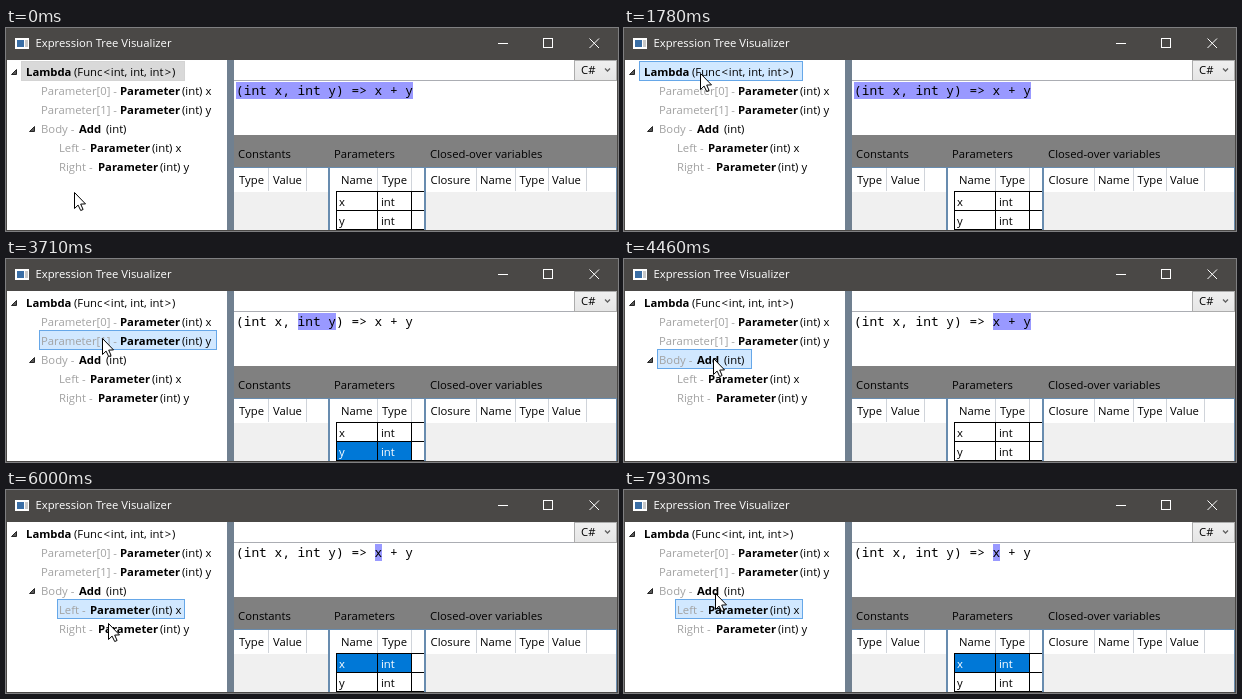
These frames come from a looping animation (612x203 px, 8 s). An HTML page with a canvas:

```html
<!DOCTYPE html>
<html lang="en">
<head>
<meta charset="utf-8">
<title>Expression Tree Visualizer</title>
<style>
  html, body { margin: 0; width: 100%; height: 100%; overflow: hidden; background: #fff; }
  canvas { display: block; }
</style>
</head>
<body>
<canvas id="stage" width="612" height="203"></canvas>
<script>
const ctx = document.getElementById('stage').getContext('2d');
const LOOP = 8000;
const TICKS = 104;
const UI = '11.3px "Open Sans", sans-serif';
const BOLD = 'bold 11.3px "Open Sans", sans-serif';
const CODE = '12.83px "Noto Sans Mono", monospace';
const GRAY = '#808080', MUTED = '#a2a2a2', GRID = '#688caf', PICKED = '#0078d7';
const TITLE = '#4a4846', SPLITTER = '#708090';

// Each row: selection box left/right, then text pieces as [x, text, style].
const rows = [
  { box: [15, 179], parts: [[20, 'Lambda', 'bold'], [68, '(Func'], [97.4, '<'],
    [104.8, 'int, int, int'], [158.7, '>'], [166, ')']] },
  { box: [33, 211], parts: [[35, 'Parameter[0] -', 'muted'], [114, 'Parameter', 'bold'], [176, '(int) x']] },
  { box: [33, 211], parts: [[35, 'Parameter[1] -', 'muted'], [114, 'Parameter', 'bold'], [176, '(int) y']] },
  { box: [33, 128], parts: [[35, 'Body -', 'muted'], [73, 'Add', 'bold'], [100, '(int)']] },
  { box: [51, 179], parts: [[53, 'Left -', 'muted'], [84, 'Parameter', 'bold'], [146, '(int) x']] },
  { box: [51, 189], parts: [[53, 'Right -', 'muted'], [92, 'Parameter', 'bold'], [154, '(int) y']] }
];

// Selection changes: start in ms, tree row, marked code characters, table row.
const selections = [
  { at: 0, row: 0, code: [0, 23], inactive: true },
  { at: 1410, row: 0, code: [0, 23] },
  { at: 2320, row: 1, code: [1, 6], param: 0 },
  { at: 3240, row: 2, code: [8, 13], param: 1 },
  { at: 4310, row: 3, code: [18, 23] },
  { at: 5310, row: 4, code: [18, 19], param: 0 },
  { at: 6540, row: 5, code: [22, 23], param: 1 },
  { at: 7540, row: 4, code: [18, 19], param: 0 }
];

// Pointer path: tick, x, y.
const path = [
  [0, 68, 164], [3, 68, 164], [10, 74, 44], [22, 74, 44], [27, 92, 58], [35, 92, 58],
  [39, 95, 77], [46, 96, 78], [48, 96, 79], [53, 89, 99], [58, 89, 99], [66, 103, 126],
  [67, 104, 126], [68, 104, 126], [72, 102, 122], [74, 102, 122], [80, 102, 137],
  [90, 102, 137], [91, 102, 133], [95, 99, 118], [98, 99, 118], [103, 91, 103], [104, 91, 103]
];

function rect(x, y, w, h, color) {
  ctx.fillStyle = color;
  ctx.fillRect(x, y, w, h);
}

function frame(x, y, w, h, color) {
  ctx.strokeStyle = color;
  ctx.lineWidth = 1;
  ctx.strokeRect(x + .5, y + .5, w - 1, h - 1);
}

function text(value, x, y, color = '#000', font = UI) {
  ctx.font = font;
  ctx.fillStyle = color;
  ctx.fillText(value, x, y);
}

function line(points, color, width = 1) {
  ctx.beginPath();
  points.forEach(([x, y]) => ctx.lineTo(x, y));
  ctx.strokeStyle = color;
  ctx.lineWidth = width;
  ctx.stroke();
}

function polygon(points, fill, stroke) {
  ctx.beginPath();
  points.forEach(([x, y]) => ctx.lineTo(x, y));
  ctx.closePath();
  ctx.fillStyle = fill;
  ctx.fill();
  ctx.strokeStyle = stroke;
  ctx.lineWidth = 1;
  ctx.stroke();
}

function drawTitleBar() {
  rect(0, 0, 612, 32, TITLE);
  rect(9, 10, 14, 11, '#fff');
  rect(11, 12, 7, 7, '#3a6ea5');
  rect(19, 12, 3, 7, '#c8c8c8');
  text('Expression Tree Visualizer', 29.5, 19, '#fff');
  rect(492, 15, 10, 1, '#fff');
  frame(537, 10, 10, 10, '#fff');
  line([[583.5, 10.5], [593, 20]], '#fff');
  line([[593, 10.5], [583.5, 20]], '#fff');
}

function drawTree(selected) {
  rect(1, 32, 220, 170, '#fff');
  const [left, right] = rows[selected.row].box;
  const top = 33 + selected.row * 19;
  rect(left, top, right - left, 20, selected.inactive ? '#d9d9d9' : '#d1e8ff');
  frame(left, top, right - left, 20, selected.inactive ? '#d4d4d4' : '#66a7e8');
  rows.forEach((row, i) => {
    const y = Math.round(48 + i * 18.9);
    for (const [x, value, style] of row.parts) {
      text(value, x, y, style === 'muted' ? MUTED : '#000', style === 'bold' ? BOLD : UI);
    }
  });
  for (const [x, y] of [[5, 41], [23, 98]]) {
    polygon([[x + 5.5, y + .5], [x + 5.5, y + 5.5], [x + .5, y + 5.5]], '#595959', '#262626');
  }
}

function drawCode([from, to]) {
  rect(227, 32, 384, 75, '#fff');
  rect(227, 52, 384, 1, '#abadb3');
  const shade = ctx.createLinearGradient(0, 32, 0, 53);
  shade.addColorStop(0, '#f0f0f0');
  shade.addColorStop(1, '#e5e5e5');
  rect(568, 32, 43, 21, shade);
  frame(568, 32, 43, 21, '#acacac');
  text('C#', 575, 46);
  line([[599, 40.5], [601.5, 43], [604, 40.5]], '#606060', 1.3);

  const advance = 7.7;
  const start = Math.round(230 + from * advance);
  rect(start, 54, Math.round(230 + to * advance) - start, 17, '#9999ff');
  text('(int x, int y) => x + y', 230, 67, '#000', CODE);
}

function drawTable(x, right, title, columns) {
  text(title, x + 5, 130);
  rect(x, 139, right - x, 64, '#f0f0f0');
  rect(x, 139, right - x, 25, '#fff');
  frame(x, 139, right - x, 65, GRID);
  for (const [labelX, label, divider] of columns) {
    text(label, labelX, 156);
    rect(divider, 140, 1, 23, '#d0d4da');
  }
}

function drawParameters(picked) {
  rect(324, 163, 94, 39, '#fff');
  ['x', 'y'].forEach((name, i) => {
    const y = 164 + i * 19;
    const active = picked === i;
    if (active) rect(331, y, 75, 18, PICKED);
    text(name, 333, y + 14, active ? '#fff' : '#000');
    text('int', 375, y + 14, active ? '#fff' : '#000');
  });
  for (const y of [163, 182, 201]) rect(330, y, 88, 1, '#000');
  for (const x of [330, 371, 405]) rect(x, 163, 1, 39, '#000');
}

function drawPointer(tick) {
  const next = path.findIndex(key => key[0] > tick);
  const [t0, x0, y0] = path[next - 1];
  const [t1, x1, y1] = path[next];
  const p = (tick - t0) / (t1 - t0);
  const eased = p * p * (3 - 2 * p);
  ctx.save();
  ctx.translate(Math.round(x0 + (x1 - x0) * eased) + .5, Math.round(y0 + (y1 - y0) * eased) + .5);
  polygon([[0, 0], [0, 16], [3.6, 12.6], [6.2, 18], [8.6, 17], [6.2, 11.6], [11, 11.4]], '#fff', '#000');
  ctx.restore();
}

function draw(now) {
  const time = now % LOOP;
  const selected = selections.findLast(s => s.at <= time);
  rect(0, 0, 612, 203, GRAY);
  drawTitleBar();
  drawTree(selected);
  drawCode(selected.code);
  drawTable(227, 323, 'Constants', [[233, 'Type', 262], [267, 'Value', 300]]);
  drawTable(323, 419, 'Parameters', [[335, 'Name', 371], [376, 'Type', 405]]);
  drawTable(419, 611, 'Closed-over variables',
    [[424.5, 'Closure', 470], [474, 'Name', 509], [513.5, 'Type', 542], [546, 'Value', 580]]);
  drawParameters(selected.param);
  rect(221, 32, 7, 170, SPLITTER);
  for (const x of [0, 611]) rect(x, 32, 1, 171, TITLE);
  rect(0, 202, 612, 1, TITLE);
  drawPointer(Math.floor(time * TICKS / LOOP));
}

const began = performance.now();
function loop() {
  draw(performance.now() - began);
  requestAnimationFrame(loop);
}
loop();
</script>
</body>
</html>
```
